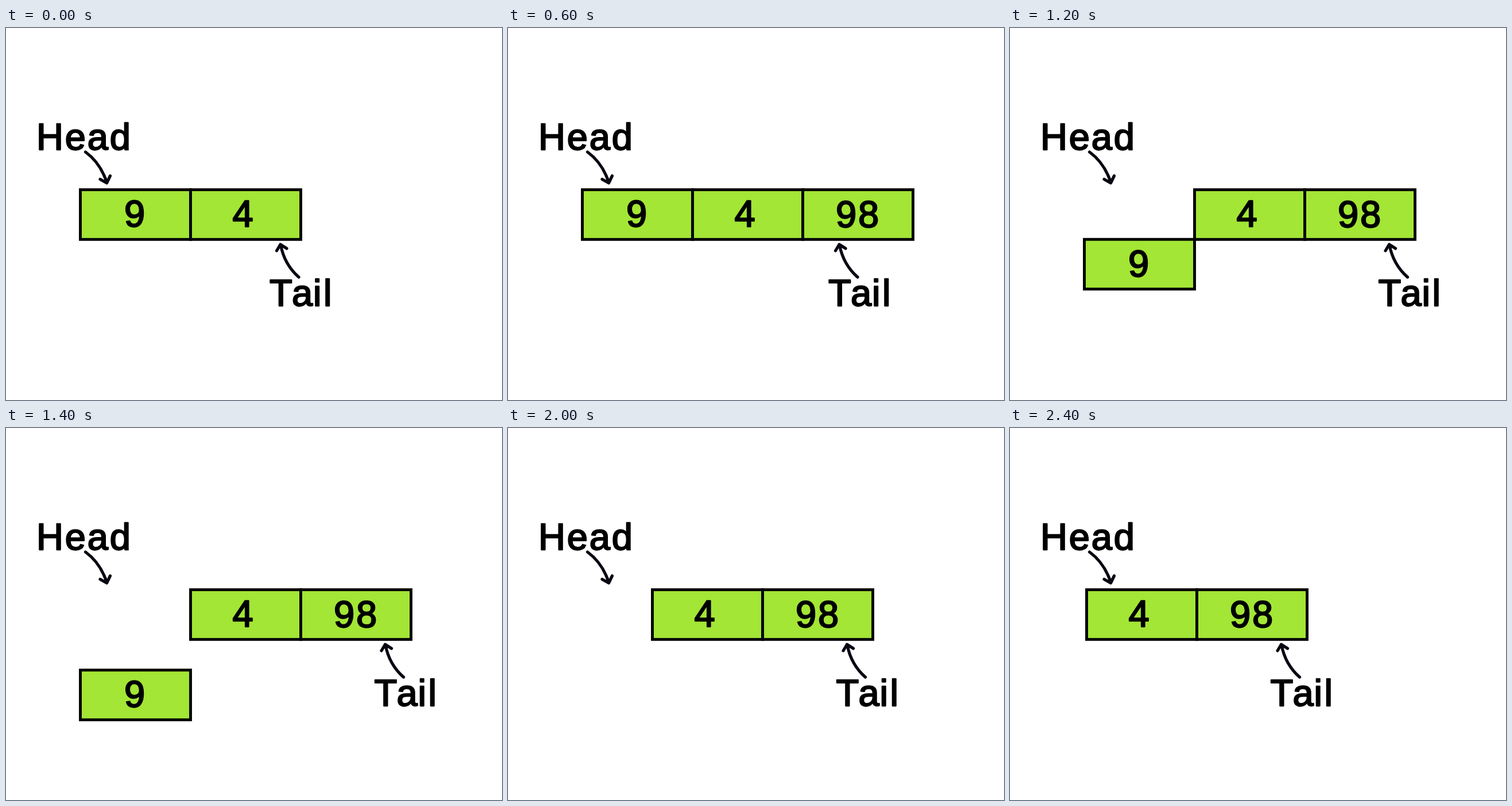
An HTML page that plays this animation: 864x648 px, repeating every 2600 ms.

```html
<!DOCTYPE html>
<html lang="en">
<head>
<meta charset="utf-8">
<title>Queue: enqueue and dequeue</title>
<style>
  html, body { margin: 0; width: 100%; height: 100%; overflow: hidden; background: #fff; }
  svg { display: block; width: 100%; height: 100%; }
  text {
    font: 65px "Liberation Sans", Arial, sans-serif;
    font-kerning: none;
    letter-spacing: 2.8px;
    stroke: #000;
    stroke-width: 2.3;
    stroke-linejoin: round;
  }
  rect { fill: #a3e635; stroke: #000; stroke-width: 4.9; }
  path { fill: none; stroke: #080812; stroke-width: 5.2; stroke-linecap: round; stroke-linejoin: round; }
</style>
</head>
<body>
<svg viewBox="0 0 864 648">
  <g id="first">
    <rect x="129.5" y="281.7" width="192" height="86.6"/>
    <text x="206" y="346">9</text>
  </g>
  <g id="rest">
    <rect x="321.5" y="281.7" width="192" height="86.6"/>
    <text x="394.5" y="346">4</text>
    <g id="added">
      <rect x="513.5" y="281.7" width="192" height="86.6"/>
      <text x="571" y="346.7">98</text>
    </g>
  </g>
  <g>
    <text x="53" y="212.3">Head</text>
    <path d="M138.5 216Q164.5 235 175.5 269M164 263.5L175.5 270L181.5 257.5"/>
  </g>
  <g id="tail">
    <text x="459 498 535 553" y="484">Tail</text>
    <path d="M510 434Q485 412 478.5 378M471.5 388L478 377L489 384"/>
  </g>
</svg>
<script>
  const STEP = 200, LOOP = 2600;
  const [first, rest, added, tail] =
    ["first", "rest", "added", "tail"].map(id => document.getElementById(id));

  // Offsets per step; the first or last value holds outside each range.
  const pick = (values, i) => values[Math.max(0, Math.min(values.length - 1, i))];
  const tailGrow = [0, 35, 99, 182.5];
  const drop = [0, 36.5, 86.5, 140];
  const slide = [0, -30, -70, -139, -188];

  const move = (el, x, y = 0) => el.setAttribute("transform", `translate(${x} ${y})`);
  const show = (el, on) => el.setAttribute("visibility", on ? "visible" : "hidden");

  function draw(now) {
    const step = Math.floor(now % LOOP / STEP);
    const shift = pick(slide, step - 8);
    move(first, 0, pick(drop, step - 4));
    show(first, step < 8);
    show(added, step > 0);
    move(rest, shift);
    move(tail, pick(tailGrow, step - 1) + shift);
  }

  const start = performance.now();
  function tick() {
    draw(performance.now() - start);
    requestAnimationFrame(tick);
  }
  tick();
</script>
</body>
</html>
```
